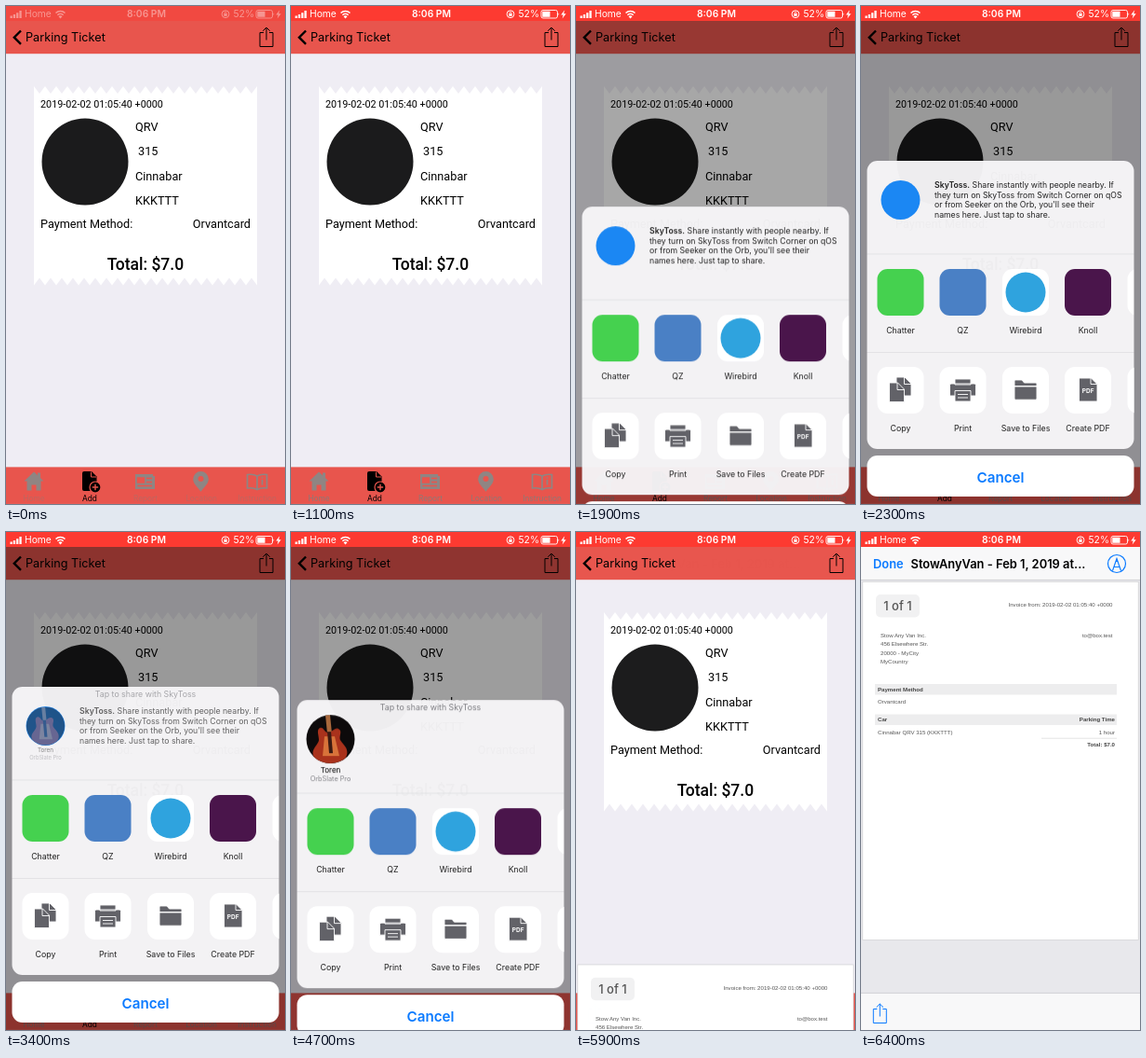
Animation, 300 px wide and 534 px high, one loop 8000 ms. Source, as an HTML page:

```html
<!DOCTYPE html>
<html lang="en">
<head>
<meta charset="utf-8">
<title>Parking Ticket</title>
<style>
  html, body { margin: 0; width: 100%; height: 100%; overflow: hidden; background: #efedf4; }
  svg { display: block; width: 100vw; height: 100vh; }
  text { font-family: Inter, "Liberation Sans", sans-serif; }
  .mid { text-anchor: middle; }
  .end { text-anchor: end; }
  .ticket text { font: 400 12.7px Roboto, sans-serif; }
  .ticket .date { font-size: 10.8px; }
  .ticket .total { font-size: 17.5px; font-weight: 500; }
  .tabs text { font-size: 8.3px; }
  .status text { font-size: 10.3px; }
  .labels text { font-size: 8.8px; }
  .hint text { font-size: 8.7px; }
  .doc text { font: 6.1px "Liberation Sans", Arial, sans-serif; fill: #555; }
  .doc .b { font-weight: 700; fill: #444; }
  .doc .count { font: 500 13px Inter, sans-serif; fill: #555; }
  .line { fill: none; stroke: #000; }
  .blue { fill: none; stroke: #0a7aff; }

  .wake, .tabwake, .sheet, .dim, .hint, .drop, .avatar, .prompt, .page, .bars {
    animation: 8s linear infinite both;
  }
  .wake { animation-name: wake; }
  .tabwake { animation-name: tabwake; }
  .sheet { animation-name: sheet; }
  .dim { animation-name: dim; }
  .hint { animation-name: hint; }
  .drop { animation-name: drop; }
  .avatar { animation-name: avatar; transform-origin: 42.5px 208px; }
  .prompt { animation-name: prompt; }
  .page { animation-name: page; }
  .bars { animation-name: bars; }

  @keyframes wake { 0% { opacity: .42 } 2.5%, 100% { opacity: 1 } }
  @keyframes tabwake { 0% { opacity: .45 } 2.5%, 100% { opacity: 1 } }
  @keyframes sheet {
    0% { transform: translateY(368px) }
    21.63% { transform: translateY(368px); animation-timing-function: cubic-bezier(.2,.75,.2,1) }
    27.5% { transform: none }
    58.33% { transform: none; animation-timing-function: ease }
    66.1%, 100% { transform: translateY(368px) }
  }
  @keyframes dim {
    0% { opacity: 0 }
    21.63% { opacity: 0; animation-timing-function: cubic-bezier(.2,.75,.2,1) }
    27.5% { opacity: .4 }
    58.33% { opacity: .4; animation-timing-function: ease }
    66.1%, 100% { opacity: 0 }
  }
  @keyframes hint { 0%, 41.4% { opacity: 1 } 42.5% { opacity: .7 } 45.5%, 100% { opacity: 0 } }
  @keyframes drop { 0%, 41.4% { opacity: 1 } 42.5% { opacity: .9 } 45.5%, 100% { opacity: 0 } }
  @keyframes avatar {
    0%, 41.4% { opacity: 0; transform: scale(.7) }
    42.5% { opacity: .45; transform: scale(.79) }
    43.75% { opacity: .8; transform: scale(.9) }
    45.5% { opacity: 1; transform: scale(.97) }
    48.75%, 100% { opacity: 1; transform: none }
  }
  @keyframes prompt { 0%, 41.4% { opacity: 0 } 42.5% { opacity: .65 } 45%, 100% { opacity: 1 } }
  @keyframes page {
    0% { transform: translateY(481px) }
    72.83% { transform: translateY(481px); animation-timing-function: ease }
    80%, 100% { transform: none }
  }
  @keyframes bars {
    0% { opacity: 0 }
    73.7% { opacity: 0; animation-timing-function: ease }
    80%, 100% { opacity: 1 }
  }
</style>
</head>
<body>
<svg viewBox="0 0 300 534" preserveAspectRatio="none">
  <defs>
    <clipPath id="panel"><rect x="6.5" y="166" width="287" height="309" rx="11"/></clipPath>
    <clipPath id="face"><circle cx="42.5" cy="208" r="26"/></clipPath>
    <g id="share" stroke-width="1">
      <path d="M4.5 6H.5v15h14V6h-4M7.5 14V.5M3.8 4.2 7.500.5l3.7 3.7"/>
    </g>
    <rect id="tile" width="50" height="50" rx="11"/>
  </defs>

  <rect width="300" height="534" fill="#efedf4"/>
  <rect width="300" height="51.2" fill="#e8554d"/>
  <path class="line" d="M16 26.5 8.8 33.7l7.2 7.2" stroke-width="2.4"/>
  <text x="21" y="38.2" font-size="12.7">Parking Ticket</text>
  <use href="#share" class="line" x="272.5" y="22.5"/>

  <g class="ticket">
    <path id="paper" fill="#fff"/>
    <circle cx="85" cy="167" r="46.5" fill="#1b1b1c"/>
    <text class="date" x="37" y="109">2019-02-02 01:05:40 +0000</text>
    <text x="139" y="133.5">QRV</text>
    <text x="142" y="160">315</text>
    <text x="139" y="186.5">Cinnabar</text>
    <text x="139" y="212.5">KKKTTT</text>
    <text x="37" y="237.5">Payment Method:</text>
    <text class="end" x="263" y="237.5">Orvantcard</text>
    <text class="mid total" x="150" y="282.5">Total: $7.0</text>
  </g>

  <g class="tabs">
    <rect y="494.4" width="300" height="40" fill="#e8554d"/>
    <g fill="#8f8583">
      <path d="M30 499.500 19.500 509.500h3v10h5v-6h5v6h5v-10h3l-3.500-3.400V500.500h-3v2.800z"/>
      <path d="M139 502h19v2h2v14h-21z"/>
      <path d="M209.500 499a8.300 8.300 0 0 0-8.300 8.300c0 5.200 5.200 9 8.300 13.400 3.100-4.400 8.300-8.200 8.300-13.400a8.300 8.300 0 0 0-8.300-8.300z"/>
    </g>
    <circle cx="209.5" cy="507" r="3" fill="#e8554d"/>
    <path d="M141.500 506h7v5h-7zM151 506.500h6M151 510.500h6M141.500 514.500h15.500" fill="#e8554d" stroke="#e8554d" stroke-width="1.4"/>
    <path d="M270 504c-3-1.800-7-2-10.500-1.500v14.500c3.500-.5 7.500-.3 10.500 1.500 3-1.800 7-2 10.500-1.500v-14.500c-3.500-.5-7.500-.3-10.500 1.500v14.500M275.500 508v5.500M275.500 505.300v1.200" fill="none" stroke="#8f8583" stroke-width="1.7"/>
    <path d="M82 501q0-2 2-2h8l5.500 5.500V520H84q-2 0-2-2z"/>
    <path d="M91.500 499.500v5.500h5.500" fill="none" stroke="#e8554d"/>
    <circle cx="96" cy="516" r="6" stroke="#e8554d" stroke-width="1.2"/>
    <path d="M96 512.800v6.400M92.800 516h6.400" stroke="#e8554d" stroke-width="1.4"/>
    <g class="mid tabwake" fill="#8f7875">
      <text x="30" y="531">Home</text>
      <text x="150" y="531">Report</text>
      <text x="210" y="531">Location</text>
      <text x="270" y="531">Instruction</text>
    </g>
    <text class="mid" x="90" y="531">Add</text>
  </g>

  <rect class="dim" width="300" height="534"/>

  <g class="sheet">
    <g clip-path="url(#panel)">
      <rect x="6" y="166" width="288" height="309" fill="#f6f5f7" opacity=".97"/>
      <path d="M6 266h288M6 371.500h288" stroke="#dcdbdf" stroke-width=".7"/>
      <circle class="drop" cx="42.5" cy="208" r="21" fill="#1b87f3"/>
      <g class="hint" fill="#222">
        <text x="79" y="195"><tspan font-weight="600">SkyToss.</tspan> Share instantly with people nearby. If</text>
        <text x="79" y="205.5">they turn on SkyToss from Switch Corner on qOS</text>
        <text x="79" y="216">or from Seeker on the Orb, you'll see their</text>
        <text x="79" y="226.5">names here. Just tap to share.</text>
      </g>
      <text class="mid prompt" x="150" y="176.5" font-size="8.8" fill="#7d7d82">Tap to share with SkyToss</text>
      <g class="avatar mid">
        <g clip-path="url(#face)">
          <rect x="16" y="182" width="53" height="53" fill="#0d0a0b"/>
          <path d="M37 182h5l2 20h-5z" fill="#a8683c"/>
          <path d="M31 196c4-2 5 5 9 5s7-6 11-4c5 2 0 8 2 12 3 5 9 8 7 16-3 11-29 12-35 3-5-9 4-13 5-19 0-5-3-11 1-13z" fill="#a9321c"/>
          <path d="M36 205h11l5 21H34z" fill="#d8733a"/>
          <path d="M39 200h4l2 23h-4z" fill="#3a1a12"/>
        </g>
        <text x="42.5" y="244" font-size="8">Toren</text>
        <text x="42.5" y="253" font-size="7.3" fill="#85858a">OrbSlate Pro</text>
      </g>

      <use href="#tile" x="17.5" y="282" fill="#45d14f"/>
      <use href="#tile" x="84.5" y="282" fill="#4a80c5"/>
      <use href="#tile" x="152" y="282" fill="#fff"/>
      <circle cx="177" cy="307" r="21.5" fill="#2fa3de"/>
      <use href="#tile" x="219" y="282" fill="#4a154b"/>
      <use href="#tile" x="286.5" y="282" fill="#fff"/>

      <g fill="#fff">
        <use href="#tile" x="17.5" y="387"/>
        <use href="#tile" x="84.5" y="387"/>
        <use href="#tile" x="152" y="387"/>
        <use href="#tile" x="219" y="387"/>
        <use href="#tile" x="286.5" y="387"/>
      </g>
      <g fill="#626268" stroke="#fff" stroke-width=".9">
        <path d="M38 398h9l7 7v13H38z"/>
        <path d="M46.500 398v7.500H54" fill="none"/>
        <path d="M30.500 404h9l7 7v13.500h-16z"/>
        <path d="M39 404v7.500h7.500" fill="none"/>
        <path d="M101 400h17v6h-17zM97 405h25q1.500 0 1.500 1.500V418H95.500v-11.500q0-1.500 1.500-1.500z"/>
        <path d="M101 412.500h17V424h-17z"/>
        <path d="M104 416.500h11M104 420h11" fill="none"/>
        <path d="M165 402q0-1 1-1h7l2.500 3H188q1 0 1 1v3h-24zM165 407.500h24V421q0 1.200-1.200 1.200h-21.600q-1.200 0-1.200-1.200z"/>
        <path d="M234.500 399h13l6.500 6.500V424h-19.500z"/>
        <path d="M247 399v6.500h7" fill="none"/>
      </g>
      <text class="mid" x="244.2" y="415" font-size="6.5" font-weight="700" fill="#fff">PDF</text>

      <g class="labels mid" fill="#222">
        <text x="42.5" y="351">Chatter</text>
        <text x="109.5" y="351">QZ</text>
        <text x="177" y="351">Wirebird</text>
        <text x="244" y="351">Knoll</text>
        <text x="42.5" y="455.5">Copy</text>
        <text x="109.5" y="455.5">Print</text>
        <text x="177" y="455.5">Save to Files</text>
        <text x="244" y="455.5">Create PDF</text>
      </g>
    </g>
    <rect x="6.5" y="482" width="287" height="44" rx="11" fill="#fff"/>
    <text class="mid" x="150" y="510.5" font-size="15.2" font-weight="600" fill="#0a7aff">Cancel</text>
  </g>

  <rect class="bars" width="300" height="534" fill="#e8e8ec"/>
  <g class="page doc">
    <rect x="1.8" y="53.3" width="296.4" height="384" fill="#fff" stroke="#cfcfd2" stroke-width=".7"/>
    <rect x="16" y="67" width="47" height="24.5" rx="5" fill="#f1f1f2"/>
    <text class="mid count" x="39.5" y="84">1 of 1</text>
    <text class="end" x="270.5" y="80.3">Invoice from: 2019-02-02 01:05:40 +0000</text>
    <text x="21" y="113.2">Stow Any Van Inc.</text>
    <text x="21" y="122.4">456 Elsewhere Str.</text>
    <text x="21" y="131.6">20000 - MyCity</text>
    <text x="21" y="140.8">MyCountry</text>
    <text class="end" x="270.5" y="113.2">to@box.test</text>
    <path d="M15 163h260v11.500H15zM15 195.500h260V207H15z" fill="#ededee"/>
    <text class="b" x="18" y="170.8">Payment Method</text>
    <text x="18" y="184.2">Orvantcard</text>
    <text class="b" x="18" y="203.2">Car</text>
    <text class="b end" x="273" y="203.2">Parking Time</text>
    <text x="18" y="216.5">Cinnabar QRV 315 (KKKTTT)</text>
    <text class="end" x="273" y="216.5">1 hour</text>
    <path d="M194 221.200h81" stroke="#ddd" stroke-width=".8"/>
    <text class="b end" x="273" y="230.3">Total: $7.0</text>
  </g>
  <g class="bars">
    <path d="M0 0h300v51.200H0zM0 494.400h300v40H0z" fill="#f8f8f9"/>
    <path d="M0 51.400h300M0 494.400h300" stroke="#bdbdc1" stroke-width=".6"/>
    <g font-size="12.9" font-weight="600">
      <text x="13" y="38.5" fill="#0a7aff">Done</text>
      <text x="53.5" y="38.5">StowAnyVan - Feb 1, 2019 at...</text>
    </g>
    <circle class="blue" cx="275" cy="34" r="9.5" stroke-width="1.2"/>
    <path class="blue" d="M270.500 41.500 275 28.500l4.500 13M272 37.500h6" stroke-width="1.1"/>
    <path d="m273.800 32 1.200-4 1.200 4z" fill="#0a7aff"/>
    <use href="#share" class="blue" x="12.8" y="505.5"/>
  </g>

  <rect class="wake" width="300" height="16" fill="#fd3a31"/>
  <g class="status wake" fill="#fff">
    <path d="M4.500 10.500h2.300V13H4.500zM7.800 9h2.300v4H7.800zM11.100 7.200h2.300V13h-2.300zM14.400 5h2.300v8h-2.300z"/>
    <text x="20" y="12.4">Home</text>
    <path d="M53.500 7.500a7 7 0 0 1 10 0M55.400 9.700a4.400 4.400 0 0 1 6.200 0" fill="none" stroke="#fff" stroke-width="1.5"/>
    <path d="m58.500 13.500-2-2.200a2.900 2.900 0 0 1 4 0z"/>
    <text class="mid" x="151" y="12.4" font-weight="600">8:06 PM</text>
    <circle cx="236" cy="8.7" r="3.9" fill="none" stroke="#fff"/>
    <path d="M234.300 8.200h3.400v2.600h-3.400z"/>
    <path d="M235 8.300V7.500a1 1 0 0 1 2 0v.8" fill="none" stroke="#fff" stroke-width=".7"/>
    <text class="end" x="267" y="12.4">52%</text>
    <rect x="269" y="4.5" width="17.5" height="8.5" rx="2" fill="none" stroke="#fff" stroke-width=".9"/>
    <path d="M270.300 5.800h8.200v5.900h-8.200zM287.500 7.300q1.600 1.400 0 3zM294.300 4.300l-4 5.200h2.400l-1 4 4-5.300h-2.500z"/>
  </g>
</svg>
<script>
  // Ticket outline with saw-toothed top and bottom edges
  const upper = "l6 8 6-8".repeat(20);
  const lower = "l-6-8-6 8".repeat(20);
  document.getElementById("paper").setAttribute("d", `M30 86${upper}V299.5${lower}z`);
</script>
</body>
</html>
```
